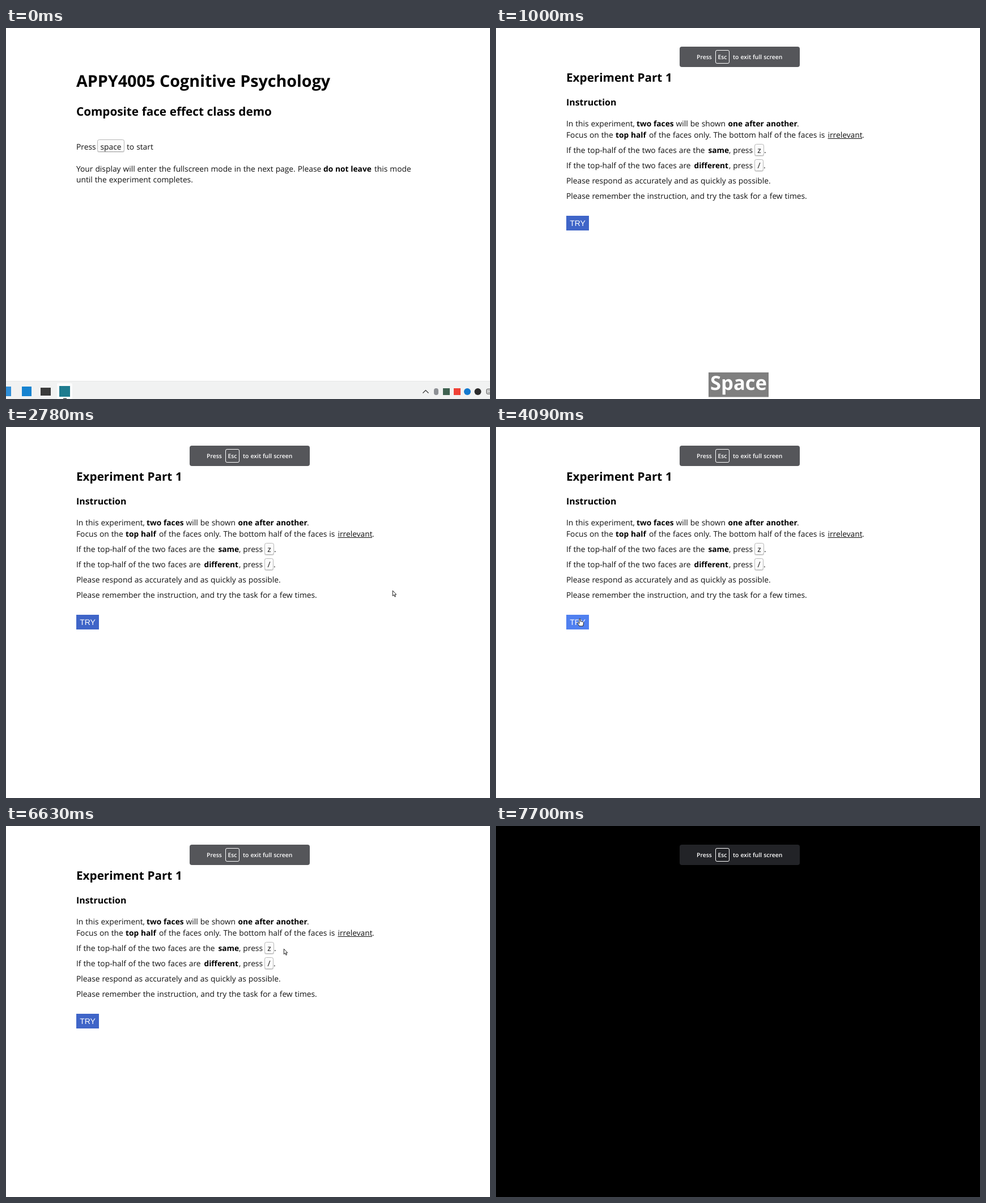
Animation of 854 by 656 pixels, one loop 8 s. Source, as an HTML page:

```html
<!DOCTYPE html>
<html lang="en">
<head>
<meta charset="utf-8">
<title>Composite face effect demo</title>
<style>
  html, body { margin: 0; width: 100%; height: 100%; overflow: hidden; background: #fff; }
  svg { display: block; width: 854px; height: 656px; }
  text { font: 13.8px "Open Sans", "Noto Sans", sans-serif; word-spacing: .35px; fill: #111; white-space: pre; text-rendering: geometricPrecision; }
  .b { font-weight: 700; fill: #000; }
  tspan.b { font-size: 13.7px; }
  .h1 { font-size: 28.7px; }
  .h2 { font-size: 20.7px; }
  .h3 { font-size: 15.9px; }
  .key rect { fill: #fbfbfb; stroke: #b8b8b8; }
  .key .shade { fill: #d4d4d4; stroke: none; }
  .mid { text-anchor: middle; }
  #popup text { font-size: 10.4px; font-weight: 600; fill: #fff; }
  #badge text { font-size: 34.6px; font-weight: 700; fill: #fff; }
  #button text { font: 14px "Liberation Sans", Arial, sans-serif; fill: #fff; }
  #cursors path { fill: #fff; stroke: #222; stroke-linejoin: round; }
  #cursors .line { fill: none; stroke-width: 1.3; }
  #cursors .halo { fill: none; stroke: #fff; stroke-width: 3; }
</style>
</head>
<body>
<svg viewBox="0 0 854 656">
  <rect id="back" width="854" height="656" fill="#fff"/>

  <g id="welcome">
    <text class="b h1" x="124" y="104">APPY4005 Cognitive Psychology</text>
    <text class="b h2" x="124" y="155">Composite face effect class demo</text>
    <g class="key">
      <rect class="shade" x="161" y="198" width="48" height="22" rx="3"/>
      <rect x="161.5" y="197.5" width="47" height="21" rx="3"/>
    </g>
    <text x="124" y="214.5">Press<tspan class="mid" x="185">space</tspan><tspan x="213">to start</tspan></text>
    <text x="124" y="253.5">Your display will enter the fullscreen mode in the next page. Please<tspan class="b" x="560">do not leave</tspan><tspan x="650">this mode</tspan></text>
    <text x="124" y="273">until the experiment completes.</text>
  </g>

  <g id="taskbar">
    <rect y="624" width="854" height="32" fill="#f1f2f2"/>
    <rect y="624" width="854" height="1" fill="#e6e7e7"/>
    <rect x="0" y="634" width="9" height="17" fill="#2f8fd8"/>
    <rect x="28" y="634" width="17" height="17" fill="#1683d0"/>
    <rect x="61" y="636" width="18" height="14" fill="#3b3b3b"/>
    <rect x="90" y="628" width="27" height="28" rx="2" fill="#fcfcfc"/>
    <rect x="94" y="633" width="19" height="19" fill="#1f7c8f"/>
    <rect x="101" y="654.5" width="6" height="1.5" fill="#555"/>
    <path d="M735.5 645.5l5-5 5 5" fill="none" stroke="#333" stroke-width="1.2"/>
    <rect x="755" y="637" width="8" height="12" rx="4" fill="#8d9095"/>
    <rect x="771" y="637" width="12" height="12" fill="#3f6150"/>
    <rect x="790" y="637" width="12" height="12" fill="#ef4136"/>
    <circle cx="814" cy="643" r="6" fill="#1279cf"/>
    <circle cx="832.5" cy="643" r="6" fill="#2b2b2b"/>
    <rect x="848" y="638.5" width="12" height="8.5" rx="1.5" fill="none" stroke="#333"/>
    <path d="M850 641.5h4M850 644.5h4" stroke="#333" stroke-dasharray="1.5 1"/>
  </g>

  <g id="task">
    <text class="b h2" x="124" y="94.5">Experiment Part 1</text>
    <text class="b h3" x="124" y="137">Instruction</text>
    <text x="124" y="174">In this experiment,<tspan class="b" x="248">two faces</tspan><tspan x="317.5">will be shown</tspan><tspan class="b" x="409.5">one after another</tspan><tspan x="531">.</tspan></text>
    <text x="124" y="193.5">Focus on the<tspan class="b" x="211">top half</tspan><tspan x="270">of the faces only. The bottom half of the faces is</tspan><tspan x="585.5">irrelevant</tspan><tspan x="646">.</tspan></text>
    <path d="M585.5 195.5h60.5" stroke="#111"/>
    <g class="key">
      <rect class="shade" x="456" y="206" width="17" height="21" rx="3"/>
      <rect x="456.5" y="205.5" width="16" height="20" rx="3"/>
      <rect class="shade" x="456" y="233" width="16" height="21" rx="3"/>
      <rect x="456.5" y="232.5" width="15" height="20" rx="3"/>
    </g>
    <text x="124" y="220.5">If the top-half of the two faces are the<tspan class="b" x="374.5">same</tspan><tspan x="411">, press</tspan><tspan class="mid" x="464.5">z</tspan><tspan x="473">.</tspan></text>
    <text x="124" y="247.5">If the top-half of the two faces are<tspan class="b" x="349.5">different</tspan><tspan x="411">, press</tspan><tspan class="mid" x="464">/</tspan><tspan x="472">.</tspan></text>
    <text x="124" y="274.5">Please respond as accurately and as quickly as possible.</text>
    <text x="124" y="301.5">Please remember the instruction, and try the task for a few times.</text>
    <g id="button">
      <rect x="124" y="332" width="40" height="26"/>
      <text class="mid" x="144" y="350">TRY</text>
    </g>
  </g>

  <g id="popup">
    <rect x="324" y="33" width="212" height="36" rx="4" fill="#2b2c31" fill-opacity=".8"/>
    <rect x="387.5" y="39.5" width="24" height="23" rx="2.5" fill="none" stroke="#fff"/>
    <text x="354" y="54.5">Press<tspan class="mid" x="399.5">Esc</tspan><tspan x="418">to exit full screen</tspan></text>
  </g>

  <g id="badge">
    <rect x="375" y="609" width="106" height="43.5" fill="#7f7f7f"/>
    <text class="mid" x="428" y="640">Space</text>
  </g>

  <g id="cursors">
    <path id="arrow" d="M.3.3V9.7L2.5 7.7 4 11.3 5.5 10.7 4 7.2H6.7Z"/>
    <g id="beam">
      <path class="halo" d="M-3.5-6h7M0-6v12M-3.5 6h7"/>
      <path class="line" d="M-3.5-6h7M0-6v12M-3.5 6h7"/>
    </g>
    <path id="hand" d="M-1 1.5Q0 0 1 1.5V5.5L5.5 6.5Q7 7 6.5 9L5.5 14H-1L-4 9.5Q-4.5 7.5-3 8L-1 9.5Z"/>
  </g>
</svg>

<script>
const LOOP = 8000;
const $ = id => document.getElementById(id);
const clamp = v => Math.min(1, Math.max(0, v));
const ramp = (t, from, to) => clamp((t - from) / (to - from));
const ease = k => k * k * (3 - 2 * k);
const show = (id, on) => $(id).style.display = on ? '' : 'none';

// Pointer strokes: start, end, intervals, then a quadratic curve.
const strokes = [
  [2780, 3480, 10, [682, 289], [330, 250], [148, 338]],
  [4090, 4220, 2, [148, 338], [149, 338], [150, 339]],
  [5480, 6230, 10, [172, 270], [230, 205], [420, 216]],
  [6230, 6430, 3, [420, 216], [465, 216], [490, 217]],
  [6630, 7370, 11, [490, 217], [25, 320], [140, 342]],
  [7440, 7580, 2, [140, 342], [141, 342], [142, 343]]
];

// Text rows under the pointer: top, bottom, right edge.
const rows = [[208, 226, 476], [235, 253, 475], [262, 280, 483], [289, 307, 546]];

function pointer(t) {
  const s = strokes.filter(s => t >= s[0]).pop();
  if (!s || t >= 7650) return null;
  const [from, to, n, a, b, c] = s;
  const k = ease(Math.floor(ramp(t, from, to) * n + 1e-6) / n), j = 1 - k;
  return [0, 1].map(i => j * j * a[i] + 2 * j * k * b[i] + k * k * c[i]);
}

function shape([x, y]) {
  if (x >= 124 && x < 164 && y >= 332 && y < 358) return 'hand';
  const onText = rows.some(([top, end, right]) => y >= top && y < end && x >= 124 && x < right);
  return onText ? 'beam' : 'arrow';
}

function buttonColor(t) {
  const k = ramp(t, 3270, 3480) - ramp(t, 5435, 5735) + ramp(t, 7160, 7370);
  const [r, g, b] = [[63, 80], [101, 128], [200, 240]].map(([u, v]) => Math.round(u + (v - u) * k));
  return `rgb(${r},${g},${b})`;
}

function draw(t) {
  const dark = t >= 7700;
  $('back').setAttribute('fill', dark ? '#000' : '#fff');
  show('taskbar', t < 70);
  show('welcome', t < 650);
  show('task', t >= 790 && !dark);
  show('badge', t >= 650 && t < 1590);
  show('popup', t >= 650);

  const k = Math.floor(ramp(t, 650, 1000) * 5 + 1e-6) / 5;
  const scale = 0.962 + 0.038 * k;
  $('popup').setAttribute('opacity', 0.19 + 0.81 * k);
  $('popup').setAttribute('transform', `translate(430 51) scale(${scale}) translate(-430 -51)`);
  $('button').firstElementChild.setAttribute('fill', buttonColor(t));

  const p = pointer(t), kind = p && shape(p);
  for (const id of ['arrow', 'beam', 'hand']) show(id, id === kind);
  if (p) $('cursors').setAttribute('transform', `translate(${p.map(Math.round)})`);
}

const start = performance.now();
function tick() {
  draw((performance.now() - start) % LOOP);
  requestAnimationFrame(tick);
}
tick();
</script>
</body>
</html>
```
